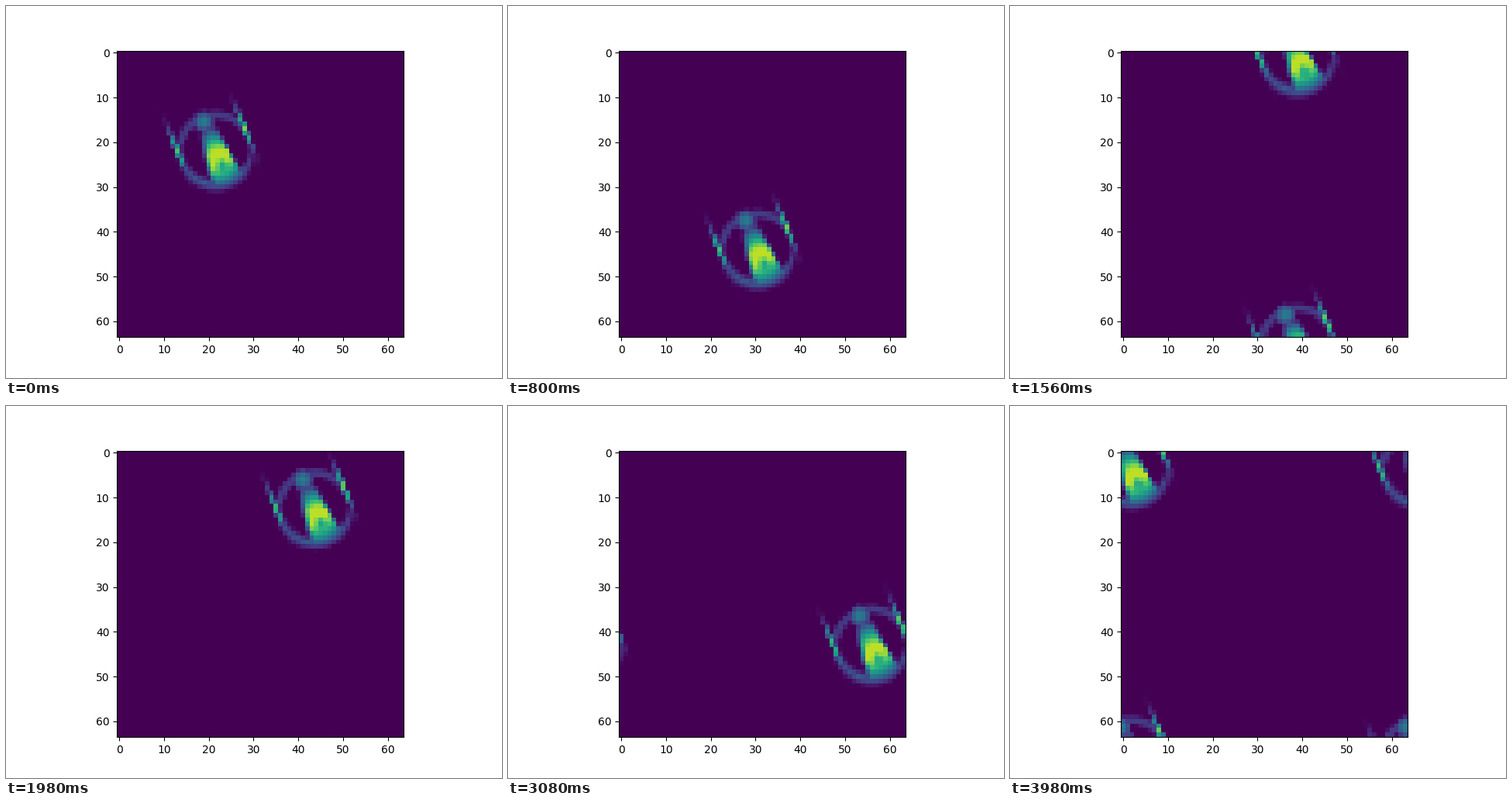
Write a matplotlib script that moves like this. It is 640 px wide and 480 px high and loops after 4 s.

```python
import numpy as np
import matplotlib.pyplot as plt
from matplotlib.animation import FuncAnimation

SIZE = 64
FRAMES = 200
START = np.array([11.4, 12.05])
VELOCITY = np.array([0.223, 0.552])
SLANT = VELOCITY[0] / VELOCITY[1]
PEAK = 0.9

rows, cols = np.mgrid[0:SIZE, 0:SIZE].astype(float)


def soft(x):
    """Edge that rises from 0 to 1 over one cell."""
    return np.clip(x + 0.5, 0, 1)


def stroke(gap, width):
    return np.clip(1 - (gap / width)**2, 0, 1)


def bump(t, centre, spread):
    return np.exp(-((t - centre) / spread)**2)


def core(x, y, s, front):
    """Bright centre: a rising tail ramp meets a falling front ramp."""
    tail = 0.5 + 0.157 * (y - 7) - 0.03 * (s - 7.2)**2
    body = np.clip(np.minimum(tail, front), 0, 1)
    left = 5.2 + 0.25 * y
    right = 8.7 + 0.3 * y + 0.014 * y**2
    body = body * soft(0.7 * (x - left)) * soft(right - x)
    return body - 0.38 * bump(x, 11.5, 1.26) * bump(y, 12.9, 1.41)


def creature(x, y):
    # sideways coordinate, constant along the direction of travel
    s = x - SLANT * y
    front = 0.16 * (8.9 - np.hypot(x - 10.2, y - 10.5))

    # crescent between two shifted circles
    hollow = 0.18 * (np.hypot(x - 10.2, y - 8.6) - 7.2)
    rim = np.clip(np.minimum(front, hollow), 0, 0.3)

    ring = 0.18 * stroke(np.hypot(x - 10.2, y - 10) - 8.1, 1.2)
    ring = ring * soft(9 - y) * soft(14.4 - s)

    head = 0.42 * (1 - ((x - 7.5) / 2.7)**2 - ((y - 3.4) / 2.7)**2)
    left_edge = 0.7 * bump(y, 10, 4.2) * stroke(s + 2.4, 0.75)
    right_edge = 0.8 * bump(y, 5, 4) * stroke(s - 14.6, 0.75)

    parts = [core(x, y, s, front), rim, ring, head, left_edge, right_edge]
    return np.clip(np.max(parts, axis=0), 0, PEAK)


def field(i):
    x0, y0 = START + VELOCITY * i
    # wrap around the torus, keeping a margin before the left and top edge
    x = (cols - x0 + 8) % SIZE - 8
    y = (rows - y0 + 8) % SIZE - 8
    return creature(x, y)


fig, ax = plt.subplots(figsize=(6.4, 4.8), dpi=100)
image = ax.imshow(field(0), cmap="viridis", vmin=0, vmax=1)


def update(i):
    image.set_data(field(i))
    return [image]


anim = FuncAnimation(fig, update, frames=FRAMES, interval=20,
                     repeat=True, repeat_delay=0)
plt.show()
```
